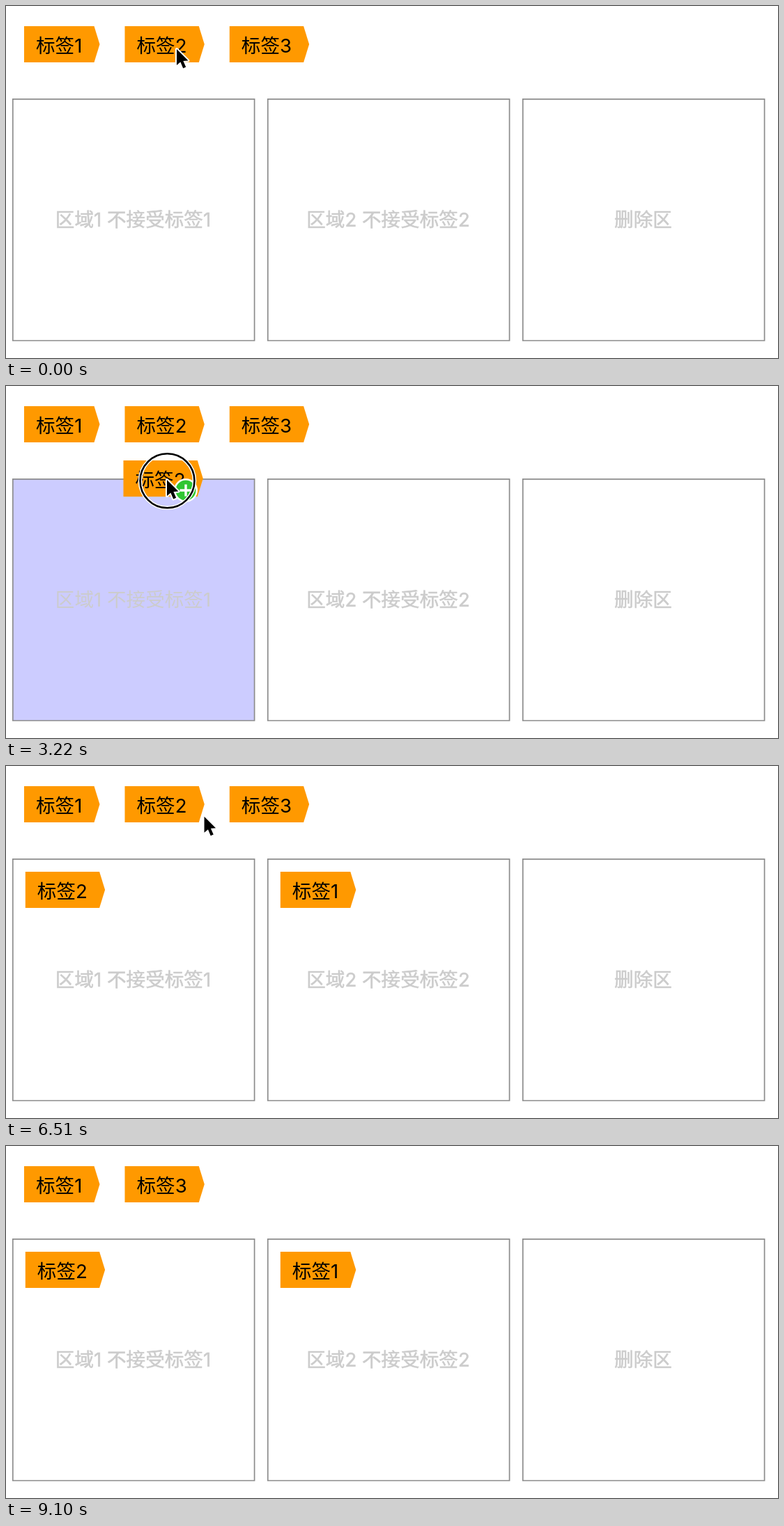
An HTML page with a canvas for the animation above (9.17 s loop, 1108 by 506 pixels).

```html
<!DOCTYPE html>
<html lang="zh-CN">
<head>
<meta charset="utf-8">
<style>
  html, body { margin: 0; width: 100%; height: 100%; overflow: hidden; background: #fff; }
  canvas { display: block; }
</style>
</head>
<body>
<canvas id="stage" width="1108" height="506"></canvas>
<script>
const ctx = document.getElementById('stage').getContext('2d');
const LOOP = 9170, STEP = 70, LAG = 30, FLY_BACK = 350, TOP = 29;
const OK = '#ccf', BAD = '#fcc';
const AREAS = ['区域1 不接受标签1', '区域2 不接受标签2', '删除区'];
const TRASH = 2;

// Pointer stops: arrival time, x, y; each move between them is eased
const STOPS = [
  [0, 245, 63], [210, 246, 65], [1000, 255, 225], [1500, 470, 240], [2070, 498, 236],
  [2240, 498, 236], [2950, 233, 58], [3060, 233, 58], [3190, 231, 136], [3220, 231, 136],
  [3600, 200, 250], [3710, 200, 250], [4050, 79, 42], [4110, 79, 42], [4590, 257, 180],
  [5050, 290, 200], [5500, 447.5, 252], [5700, 456.5, 239], [5960, 456.5, 239],
  [6650, 264, 54], [6760, 264, 54], [6980, 440, 60], [7417, 830, 198], [7800, 870, 292]
];
const DRAGS = [
  { tag: 2, press: 210, drop: 2240 },
  { tag: 2, press: 3000, drop: 3710 },
  { tag: 1, press: 4075, drop: 5880 },
  { tag: 2, press: 6720, drop: 7910 }
];

const clamp = v => Math.max(0, Math.min(1, v));
const ease = u => u * u * (3 - 2 * u);
const mix = (a, b, s) => a + (b - a) * s;
const areaX = i => 9 + 366 * i;
const tagWidth = n => n === 1 ? 108.5 : 114.3;
const accepts = (area, tag) => area === TRASH || area >= 0 && area !== tag - 1;

function areaAt([x, y]) {
  return AREAS.findIndex((_, i) => x > areaX(i) && x < areaX(i) + 348 && y > 133 && y < 482);
}

function listX(tags, tag) {
  return tags.slice(0, tags.indexOf(tag)).reduce((x, n) => x + tagWidth(n) + 36, 26);
}

function pointer(t) {
  const next = STOPS.findIndex(s => s[0] > t);
  if (next < 0) return STOPS[STOPS.length - 1].slice(1);
  const a = STOPS[next - 1], b = STOPS[next], s = ease((t - a[0]) / (b[0] - a[0]));
  return [mix(a[1], b[1], s), mix(a[2], b[2], s)];
}

for (const d of DRAGS) {
  const [x, y] = pointer(d.press);
  d.homeX = listX([1, 2, 3], d.tag);
  d.grab = [x - d.homeX, y - TOP];
  d.target = areaAt(pointer(d.drop));
  d.accepted = accepts(d.target, d.tag);
}

function polygon(points, fill) {
  ctx.beginPath();
  points.forEach(p => ctx.lineTo(...p));
  ctx.closePath();
  ctx.fillStyle = fill;
  ctx.fill();
}

function disc(x, y, r, fill) {
  ctx.beginPath();
  ctx.arc(x, y, r, 0, 7);
  ctx.fillStyle = fill;
  ctx.fill();
}

function outline(color, width) {
  ctx.strokeStyle = color;
  ctx.lineWidth = width;
  ctx.stroke();
}

function drawTag(n, x, y) {
  const w = tagWidth(n);
  polygon([[x, y], [x + w - 8, y], [x + w, y + 26], [x + w - 8, y + 52], [x, y + 52]], '#f90');
  ctx.fillStyle = '#000';
  ctx.textAlign = 'left';
  ctx.fillText('标签' + n, x + 17, y + 37.7);
}

function drawArea(i, fill) {
  const x = areaX(i);
  ctx.beginPath();
  ctx.rect(x + .8, 133.8, 346.8, 347.2);
  ctx.fillStyle = fill || '#fff';
  ctx.fill();
  outline('#8c8c8c', 1.7);
  ctx.fillStyle = ctx.strokeStyle = '#ccc';
  ctx.textAlign = 'center';
  ctx.fillText(AREAS[i], x + 173.5, 317.3);
  ctx.lineWidth = .6;
  if (!fill) ctx.strokeText(AREAS[i], x + 173.5, 317.3);
}

function drawBadge(x, y, accepted) {
  disc(x, y, 17, '#fff');
  disc(x, y, 14.5, accepted ? '#2fc632' : '#cf352e');
  ctx.save();
  ctx.translate(x, y);
  if (!accepted) ctx.rotate(Math.PI / 4);
  ctx.beginPath();
  ctx.moveTo(-8.5, 0); ctx.lineTo(8.5, 0);
  ctx.moveTo(0, -8.5); ctx.lineTo(0, 8.5);
  outline('#fff', 3.4);
  ctx.restore();
}

function drawArrow(x, y) {
  ctx.save();
  ctx.translate(x, y - 1);
  ctx.lineJoin = 'round';
  const shape = [[0, 0], [0, 23], [5.4, 18.4], [9.2, 27.5], [13.2, 25.8], [9.4, 17], [16.5, 16.6]];
  polygon(shape, '#fff');
  outline('#fff', 4);
  polygon(shape, '#000');
  ctx.restore();
}

function drawBeam(x, y) {
  ctx.beginPath();
  for (const s of [-1, 1]) {
    ctx.moveTo(x - 6, y + 13 * s);
    ctx.quadraticCurveTo(x, y + 13 * s, x, y + 9 * s);
    ctx.quadraticCurveTo(x, y + 13 * s, x + 6, y + 13 * s);
  }
  ctx.moveTo(x, y - 10); ctx.lineTo(x, y + 10);
  ctx.moveTo(x - 3, y + 4); ctx.lineTo(x + 3, y + 4);
  outline('#fff', 4);
  outline('#000', 2);
}

function drawRing(x, y, r) {
  if (r < 3) return;
  ctx.beginPath();
  ctx.arc(x, y, r - 1.5, 0, 7);
  outline('#fff', 5.5);
  outline('#000', 2.6);
}

// The dragged copy trails the pointer and glides home after a refused drop
function drawGhost(d, held, t) {
  const s = ease(clamp((t - d.drop) / FLY_BACK));
  drawTag(d.tag, mix(held[0] - d.grab[0], d.homeX, s), mix(held[1] - d.grab[1], TOP, s));
}

function render(t) {
  ctx.fillStyle = '#fff';
  ctx.fillRect(0, 0, 1108, 506);
  ctx.font = '27.6px Inter, "Noto Sans CJK SC", "Noto Sans CJK", sans-serif';

  const done = DRAGS.filter(d => d.accepted && t >= d.drop);
  const removed = done.filter(d => d.target === TRASH).map(d => d.tag);
  const drag = DRAGS.find(d => t >= d.press && t < d.drop + (d.accepted ? 0 : FLY_BACK));
  const dragging = drag && t < drag.drop;
  const tip = pointer(t);
  const held = drag && pointer(Math.min(t, drag.drop) - LAG);
  const over = dragging ? areaAt(held) : -1;
  const allowed = over >= 0 && accepts(over, drag.tag);

  const list = [1, 2, 3].filter(n => !removed.includes(n));
  list.forEach(n => drawTag(n, listX(list, n), TOP));
  AREAS.forEach((_, i) => drawArea(i, i === over && (allowed ? OK : BAD)));
  done.filter(d => d.target !== TRASH).forEach(d => drawTag(d.tag, areaX(d.target) + 18.8, 152));

  if (drag) drawGhost(drag, held, t);
  if (over >= 0) drawBadge(held[0] + 27, held[1] + 14, allowed);
  if (t >= 9030) return;

  const leaving = over >= 0 && areaAt(tip) !== over;
  (leaving ? drawBeam : drawArrow)(...tip);
  const size = Math.max(...DRAGS.map(d =>
    Math.min(clamp((t - d.press) / 110), clamp(1 - (t - d.drop) / 110))));
  drawRing(tip[0] + .5, tip[1] + .3, 40.5 * size * (leaving ? .73 : 1));
}

function tick() {
  render(Math.floor(performance.now() % LOOP / STEP) * STEP);
  requestAnimationFrame(tick);
}
tick();
</script>
</body>
</html>
```
